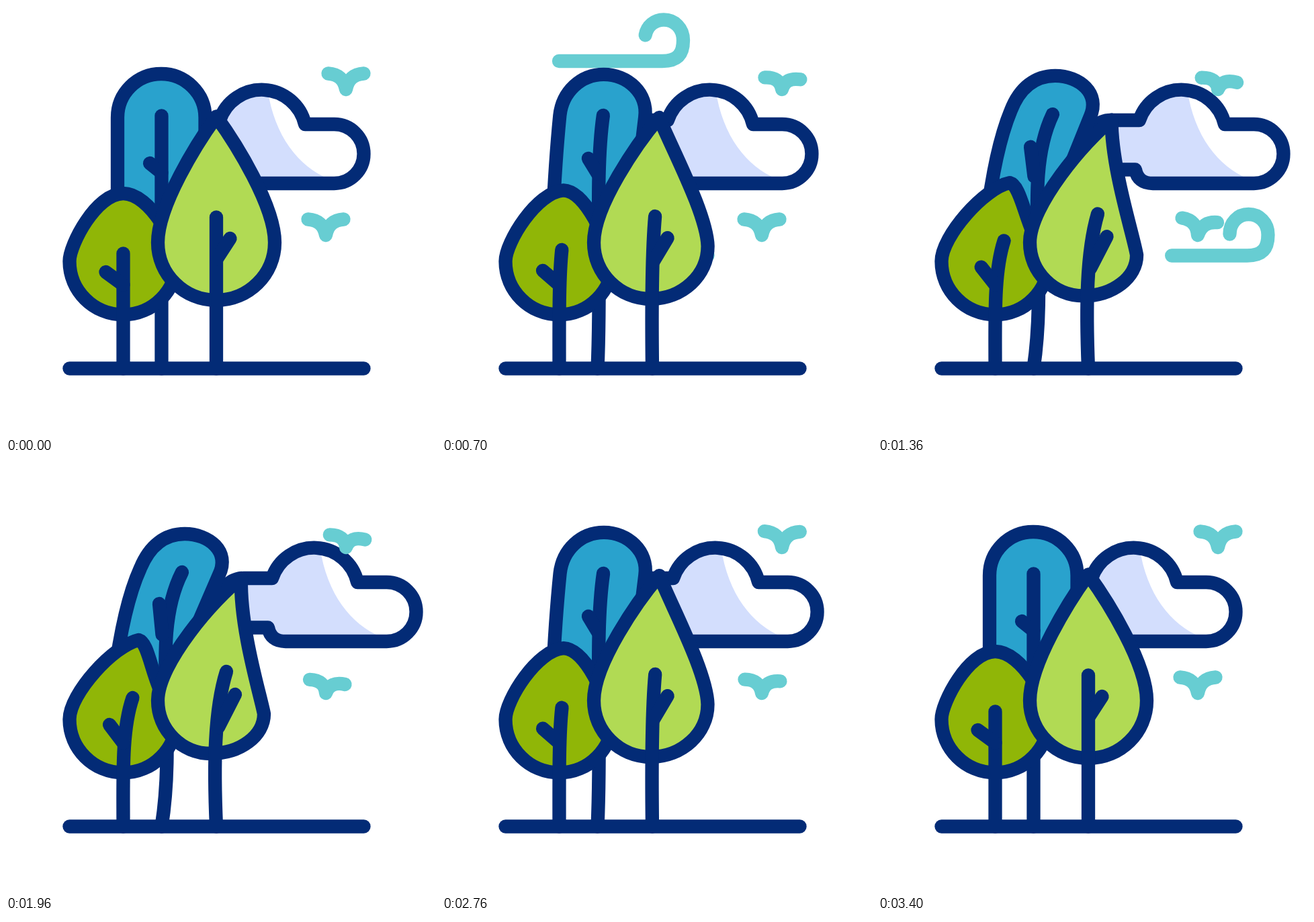
An HTML page with a canvas that plays this animation: 640 by 640 pixels, repeating every 3.6 s.

```html
<!DOCTYPE html>
<html lang="en">
<head>
<meta charset="utf-8">
<title>Windy trees</title>
<style>
html, body { margin: 0; width: 100%; height: 100%; overflow: hidden; background: #fff; }
canvas { display: block; width: 640px; height: 640px; }
</style>
</head>
<body>
<canvas id="stage" width="640" height="640"></canvas>
<script>
const ctx = document.getElementById('stage').getContext('2d');
const LOOP = 3600;
const LINE = 20.3;
const GROUND = 539.5;
const ROUND = 0.5523; // handle length of a quarter circle
const NAVY = '#032b76', TEAL = '#67cdd2', LAVENDER = '#d3defd';

const ease = x => (1 - Math.cos(Math.PI * Math.min(1, Math.max(0, x)))) / 2;
const ramp = (t, from, to) => ease((t - from) / (to - from));
const swell = (t, a, b, c, d) => ramp(t, a, b) - ramp(t, c, d);

const cloudPath = new Path2D(
  'M276 170 H318 A66 66 0 0 1 445 176 H488.5 A44 44 0 0 1 488.5 264 H338 ' +
  'Q316 264 312 243.5 H276 A36.75 36.75 0 0 1 276 170 Z');
const shadePath = new Path2D('M200 90 H386.5 C388.5 180 429.5 236 479.5 257 V300 H200 Z');

const windData = 'M174 82 H328 C351 82 359 71 359 51 ' +
  'C359 33 346 20.5 330 20.5 C314 20.5 302 33 302 50';
const windPath = new Path2D(windData);
const windShape = document.createElementNS('http://www.w3.org/2000/svg', 'path');
windShape.setAttribute('d', windData);
const windLength = windShape.getTotalLength();

function strokeWith(color, path) {
  ctx.strokeStyle = color;
  path ? ctx.stroke(path) : ctx.stroke();
}

function line(x1, y1, x2, y2) {
  ctx.beginPath();
  ctx.moveTo(x1, y1);
  ctx.lineTo(x2, y2);
  strokeWith(NAVY);
}

// Curve between two points; each handle is relative to its own point.
function arc(from, out, to, back) {
  ctx.bezierCurveTo(from[0] + out[0], from[1] + out[1], to[0] + back[0], to[1] + back[1], ...to);
}

// Lower half of a leaf: two elliptic quarters.
function bowl(right, bottom, left) {
  for (const [side, down] of [[right, true], [left, false]]) {
    const v = [0, (bottom[1] - side[1]) * ROUND];
    const h = [(side[0] - bottom[0]) * ROUND, 0];
    down ? arc(side, v, bottom, h) : arc(bottom, h, side, v);
  }
}

function paintLeaf(color) {
  ctx.fillStyle = color;
  ctx.fill();
  strokeWith(NAVY);
}

// The trunk is straight at rest; low, high and tip are its sideways shifts.
function drawTrunk(x, top, low, high, tip) {
  const rise = GROUND - top;
  ctx.beginPath();
  ctx.moveTo(x, GROUND);
  ctx.bezierCurveTo(x + low, GROUND - 0.4 * rise, x + high, GROUND - 0.75 * rise, x + tip, top);
  strokeWith(NAVY);
}

function drawTallTree(b) {
  const left = [166 + 34 * b, 166 - 11 * b];
  const top = [231 + 35 * b, 101 + 3 * b];
  const right = [296.5 + 20.5 * b, 166 - b];
  const foot = [166 - 5 * b, 320];
  ctx.beginPath();
  ctx.moveTo(...foot);
  arc(foot, [10 * b, -55 - 25 * b], left, [-15 * b, 45 - 12 * b]);
  arc(left, [14 * b, -36 + 2 * b], top, [-36 + 7 * b, 0]);
  arc(top, [36, 0], right, [17 * b, -36 + b]);
  ctx.lineTo(296.5 - 46.5 * b, 320);
  paintLeaf('#29a2cd');
  drawTrunk(231.5, 163.5 - 2.5 * b, 24 * b, -18 * b, 30.5 * b);
  line(214 + 14 * b, 234 - 26 * b, 231.5 + b, 248 + 6 * b);
}

function drawSmallTree(b) {
  const top = [174.5 + 23 * b, 279 - 17 * b];
  const right = [254, 380], bottom = [174.5, 459.5], left = [94.5, 380];
  ctx.beginPath();
  ctx.moveTo(...top);
  arc(top, [40 - 21.5 * b, 6 * b], right, [-39 * b, -25 - 25 * b]);
  bowl(right, bottom, left);
  arc(left, [0, -25 - 13 * b], top, [-40 + 2.5 * b, 8 * b]);
  ctx.closePath();
  paintLeaf('#90b607');
  drawTrunk(174.5, 368.5 - 20.5 * b, 0, -2.5 * b, 14 * b);
  line(148.5 + 5.5 * b, 396 - 8 * b, 174.5, 415);
}

function drawFrontTree(b) {
  const top = [313 + 37 * b, 164.5 + 5.5 * b];
  const right = [400 - 16 * b, 352 + 20 * b];
  const bottom = [313 - 8 * b, 438 - 7 * b];
  const left = [226, 352];
  ctx.beginPath();
  ctx.moveTo(...top);
  arc(top, [29 - 31 * b, 40 + 35 * b], right, [-5 * b, -55 + 28 * b]);
  bowl(right, bottom, left);
  arc(left, [0, -55], top, [-29 - 11 * b, 40 - 10 * b]);
  ctx.closePath();
  paintLeaf('#b1da54');
  drawTrunk(313, 314.5 - 5.5 * b, -4 * b, -3 * b, 15 * b);
  line(333.5 + 7.5 * b, 346 - 3 * b, 314 + 2 * b, 376 + 16 * b);
}

function drawCloud(shift) {
  ctx.save();
  ctx.translate(shift, 0);
  ctx.fillStyle = '#fff';
  ctx.fill(cloudPath);
  ctx.save();
  ctx.clip(cloudPath);
  ctx.fillStyle = LAVENDER;
  ctx.fill(shadePath);
  ctx.restore();
  strokeWith(NAVY, cloudPath);
  ctx.restore();
}

function drawWind(t, x, y) {
  const end = ramp(t, 200, 755), start = ramp(t, 732, 1260);
  if (end <= start) return;
  ctx.save();
  ctx.translate(x, y);
  ctx.setLineDash([windLength * (end - start), windLength * 2]);
  ctx.lineDashOffset = -windLength * start;
  strokeWith(TEAL, windPath);
  ctx.restore();
}

// The origin is the tail, around which the bird tilts.
function drawBird(x, y, tilt, flap) {
  ctx.save();
  ctx.translate(x, y);
  ctx.rotate(tilt * 0.135);
  ctx.beginPath();
  for (const side of [-1, 1]) {
    ctx.moveTo(26.5 * side, -23.5 + 10 * flap);
    ctx.quadraticCurveTo(4 * side, -22 + 5 * flap, 0, 0);
  }
  strokeWith(TEAL);
  ctx.restore();
}

function flapAt(t, start) {
  const turns = (t - start) / 745;
  return turns > 0 && turns < 3 ? (1 - Math.cos(2 * Math.PI * turns)) / 2 : 0;
}

function draw(t) {
  ctx.fillStyle = '#fff';
  ctx.fillRect(0, 0, 640, 640);
  ctx.lineWidth = LINE;
  ctx.lineCap = ctx.lineJoin = 'round';

  drawWind(t, 0, 0);
  drawWind(t - 500, 221.5, 289.5);
  drawCloud(82.7 * swell(t, 245, 1725, 1700, 3410));
  drawBird(506, 124, swell(t, 200, 1330, 1930, 2980), flapAt(t, 200));
  drawBird(476, 341, swell(t, 700, 1500, 2000, 3300), flapAt(t, 700));

  const bend = swell(t, 220, 1590, 2040, 3160);
  drawTallTree(bend);
  drawSmallTree(bend);
  drawFrontTree(bend);
  line(94.5, GROUND, 532.5, GROUND);
}

const began = performance.now();
function tick() {
  draw((performance.now() - began) % LOOP);
  requestAnimationFrame(tick);
}
tick();
</script>
</body>
</html>
```
